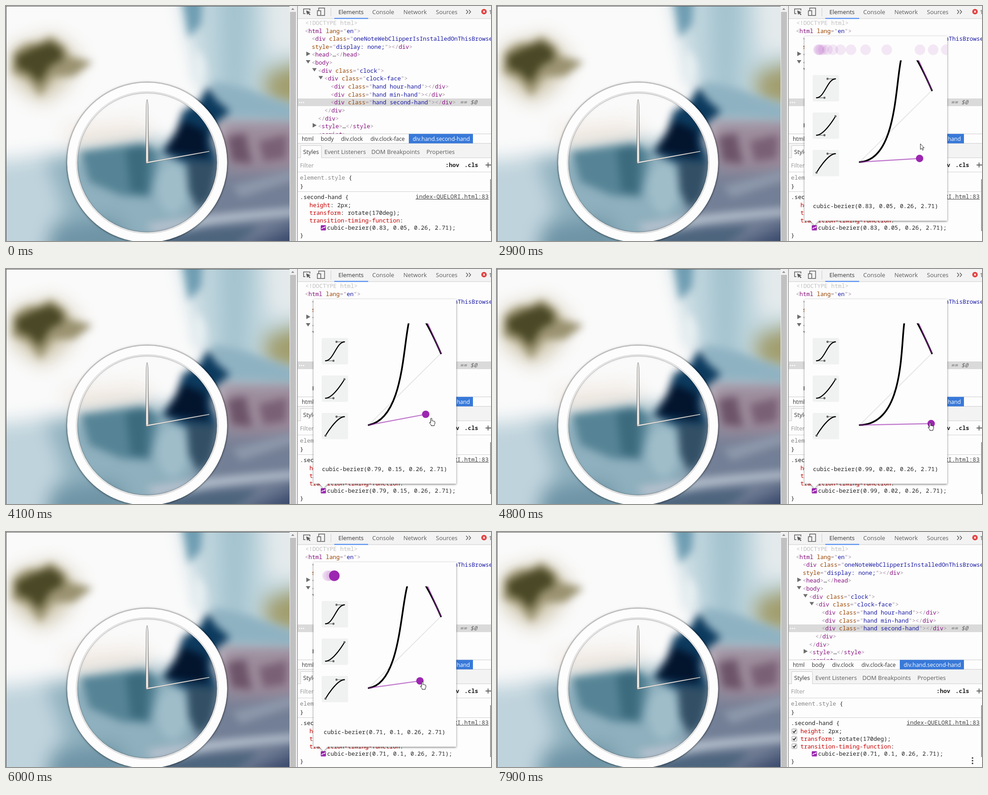
An HTML page for the animation above (8 s loop, 1074 px wide and 521 px high).

```html
<!DOCTYPE html>
<html lang="en">
<head>
<meta charset="utf-8">
<title>Easing editor</title>
<style>
html, body { margin: 0; width: 100%; height: 100%; overflow: hidden; background: #fff; }
svg { display: block; width: 1074px; height: 521px; }
text { white-space: pre; fill: #222; }
.mono { font-family: "Noto Sans Mono", "DejaVu Sans Mono", monospace; font-size: 12.83px; }
.ui { font-family: "Open Sans", "Noto Sans", sans-serif; font-size: 13px; fill: #5a5a5a; }
.crumb { font-size: 12.3px; fill: #333; }
.punct { fill: #a894a6; } .tag { fill: #881280; } .attr { fill: #994500; } .val { fill: #1a1aa6; }
.prop { fill: #c80000; } .dim { fill: #888; }
</style>
</head>
<body>
<svg viewBox="0 0 1074 521" xmlns="http://www.w3.org/2000/svg">
  <defs>
    <filter id="soft" filterUnits="userSpaceOnUse" x="-80" y="-80" width="800" height="700" color-interpolation-filters="sRGB"><feGaussianBlur stdDeviation="9"/></filter>
    <filter id="wide" filterUnits="userSpaceOnUse" x="-120" y="-120" width="880" height="780" color-interpolation-filters="sRGB"><feGaussianBlur stdDeviation="20"/></filter>
    <filter id="glow" x="-10%" y="-10%" width="120%" height="125%"><feDropShadow dx="0" dy="1.5" stdDeviation="2" flood-opacity=".5"/></filter>
    <filter id="ringShade" x="-10%" y="-10%" width="120%" height="120%"><feDropShadow dx="0" dy="0" stdDeviation="3" flood-opacity=".35"/></filter>
    <linearGradient id="steel"><stop offset="0" stop-color="#777"/><stop offset=".3" stop-color="#f5f3f0"/><stop offset=".7" stop-color="#e4e1de"/><stop offset="1" stop-color="#666"/></linearGradient>
    <clipPath id="page"><rect width="628" height="521"/></clipPath>
    <clipPath id="tree"><rect x="646" y="28" width="428" height="255"/></clipPath>
    <clipPath id="plot"><rect x="770" y="120.5" width="227" height="300"/></clipPath>
    <clipPath id="card"><rect x="681" y="67" width="316" height="409"/></clipPath>
  </defs>

  <g clip-path="url(#page)">
    <rect width="628" height="521" fill="#fafafa"/>
    <g filter="url(#wide)">
      <path d="M380-60H690V260H470Q410 120 380-60Z" fill="#bfd5dd"/>
      <path d="M470-60H545L530 230 480 220Z" fill="#a3c3cf"/>
      <path d="M570-60H690V100L580 110Z" fill="#e4eaec"/>
      <path d="M572 150L680 120V222L580 215Z" fill="#a19d6c"/>
      <path d="M-80 350Q80 335 160 325L330 300 440 320 690 240V600H-80Z" fill="#8fb0be"/>
      <path d="M-80 340H90L130 450 60 600H-80Z" fill="#bfd3dc"/>
      <path d="M100 490L240 470 330 600H90Z" fill="#6e94a6"/>
      <path d="M120 270L300 255 330 300 160 318Z" fill="#f0e8e0"/>
      <path d="M12 90L110 65 165 115 130 180 80 215 15 170Z" fill="#d0c8b0"/>
      <path d="M470 340H690V600H330L410 500Z" fill="#737f96"/>
      <path d="M455 250L690 245V370H480Z" fill="#9c8b9b"/>
      <path d="M500 550L690 465V600Z" fill="#37476a"/>
    </g>
    <g filter="url(#soft)">
      <path d="M16 105Q40 78 70 82L100 68 130 90 140 112 192 124 150 155 104 156 76 200 50 164 13 148Z" fill="#9a9270"/>
      <path d="M22 112L58 94 98 80 122 94 126 118 98 132 74 172 52 148 26 138Z" fill="#4a4826"/>
      <path d="M388-30H436L432 40 405 70Z" fill="#6f9db2"/>
      <path d="M420 95Q455 125 432 168L408 160Z" fill="#e6eef1"/>
      <path d="M455 165L540 185 640 222V252L480 245Z" fill="#8fb2c2"/>
      <path d="M448 178L468 210 496 234 462 264 455 300 470 350 440 380 400 350 345 325 376 278 392 232 425 215Z" fill="#0c3a5e"/>
      <path d="M392 255L440 275 446 335 352 324Z" fill="#03142d"/>
      <path d="M400 340L470 345 455 425 425 450 405 410Z" fill="#324f65"/>
      <path d="M490 290L530 282 545 350 500 345Z" fill="#6d5469"/>
      <path d="M560 300L622 285 620 338 570 345Z" fill="#7a6075"/>
      <path d="M165 324L300 305 340 325 318 425 255 420 185 390Z" fill="#568496"/>
      <path d="M265 318L316 308 312 415 276 412Z" fill="#3c6b7e"/>
      <ellipse cx="368" cy="405" rx="32" ry="55" fill="#9fbdc9"/>
      <path d="M500 400L640 362V384L520 425Z" fill="#8d98ab"/>
      <path d="M310 484Q430 462 640 448V464Q440 480 330 506Z" fill="#b5c0cd"/>
      <path d="M330 515Q430 488 560 488L500 540H320Z" fill="#4e657e"/>
    </g>
    <g fill="none" transform="translate(312.6 347)">
      <circle r="178.3" stroke="#000" stroke-opacity=".15" stroke-width="3"/>
      <circle r="167" stroke="#fdfdfd" stroke-width="20" filter="url(#ringShade)"/>
      <circle r="156" stroke="#efefef" stroke-width="2.6"/>
      <circle r="157.2" stroke="#bbb" stroke-width=".7"/>
      <circle r="154.3" stroke="#555" stroke-opacity=".5" stroke-width=".8"/>
    </g>
    <path d="M309.3 348.5L310.3 222Q311 210 312.5 207Q314 210 314.8 222L316 348.5Z" fill="url(#steel)" stroke="#555" stroke-width=".6"/>
    <path d="M310.5 346L450 321.4 450.3 323 311 348.8Z" fill="#f2efec" stroke="#555" stroke-width=".4"/>
    <path d="M0 .5H628M.5 0V521" stroke="#555"/>
  </g>

  <rect x="628" width="17" height="521" fill="#f1f1f1"/>
  <rect x="629" y="13" width="13" height="508" fill="#c1c1c1"/>
  <path d="M631.5 8.5L635 4.5 638.5 8.5Z" fill="#888"/>

  <rect x="645" width="429" height="521" fill="#fdfdfd"/>
  <rect x="646" width="428" height="28" fill="#f3f3f3"/>
  <path d="M646 28H1074" stroke="#ccc"/>
  <path d="M727 27.5H802" stroke="#4285f4" stroke-width="2"/>
  <path d="M719.5 4V23" stroke="#ccc"/>
  <g fill="none" stroke="#5a5a5a" stroke-width="1.5">
    <path d="M663 17H659V6.5H673V10"/>
    <path d="M665 10L674 14 670.5 15 674 19 672.5 20 669 16.5 667 19Z" fill="#5a5a5a" stroke-width=".5"/>
    <path d="M692.5 10V4.5H705.5V21H698M689.5 10.5H697V21H689.5Z"/>
    <path d="M1019 8.5L1023 13 1019 17.5M1025 8.5L1029 13 1025 17.5"/>
  </g>
  <circle cx="1058.5" cy="12.5" r="6" fill="#e03a3a"/>
  <path d="M1056.3 10.3L1060.7 14.7M1060.7 10.3L1056.3 14.7" stroke="#fff" stroke-width="1.4"/>

  <g id="dom" clip-path="url(#tree)"><rect x="646" y="205" width="428" height="17" fill="#dadada"/></g>
  <g fill="#fff"><circle cx="650" cy="214" r="1.4"/><circle cx="654.5" cy="214" r="1.4"/><circle cx="659" cy="214" r="1.4"/></g>

  <path d="M646 283.5H1074M646 304.5H1074" stroke="#ccc"/>
  <rect x="892" y="283.5" width="142" height="21" fill="#3879d9"/>
  <rect x="646" y="305" width="428" height="32" fill="#f3f3f3"/>
  <path d="M646 336.5H1074M646 368H1074M646 411.5H1074" stroke="#d0d0d0"/>
  <path d="M652.5 337V309.5H698.5V337" fill="#fdfdfd" stroke="#ccc"/>
  <path d="M1062 352.5H1074M1067.5 347V358" stroke="#5a5a5a" stroke-width="1.8"/>
  <g id="labels"></g>
  <path d="M907 428.5H1069" stroke="#444"/>
  <rect x="697" y="486" width="11.5" height="11.5" rx="1.5" fill="#9c27b0"/>
  <path d="M699 494.5Q700 491.5 703 491.5T707 488.8" fill="none" stroke="#fff" stroke-width="1.7"/>
  <text id="cssValue" class="mono" x="711" y="496"></text>
  <rect x="1072" y="384" width="2" height="115" fill="#9a9a9a"/>
  <g id="checks"></g>
  <g id="dots" fill="#333"><circle cx="1053" cy="501" r="1.7"/><circle cx="1053" cy="507" r="1.7"/><circle cx="1053" cy="513" r="1.7"/></g>
  <path d="M645.5 0V521" stroke="#777"/>

  <g id="popup">
    <path d="M683 67H995Q997 67 997 69V474Q997 476 995 476H712L703 485.5 694 476H683Q681 476 681 474V69Q681 67 683 67Z" fill="#fdfdfd" filter="url(#glow)"/>
    <g clip-path="url(#card)" fill="#9c27b0"><g id="trail"></g><circle id="ball" cy="97" r="11.7"/></g>
    <g id="presets"></g>
    <g clip-path="url(#plot)" fill="none">
      <path d="M803 346L963 187" stroke="#e8e8e8" stroke-width="2.3"/>
      <path id="curve" stroke="#000" stroke-width="3.7" stroke-linecap="round"/>
      <path id="levers" stroke="#9c27b0" stroke-opacity=".6" stroke-width="2.4"/>
    </g>
    <circle id="knob" r="8.2" fill="#9c27b0"/>
    <text id="popupValue" class="mono" x="838.3" y="448" text-anchor="middle"></text>
  </g>

  <g id="cursor" stroke="#111" fill="#fff" stroke-linejoin="round">
    <path id="arrow" d="M.5.5V13L3.3 10.3 5.2 14.8 7.3 13.9 5.4 9.5H9Z" stroke-width=".9"/>
    <path id="hand" d="M-1.6 1.2Q-1.6-.2-.2-.2T1.2 1.2V6Q2.5 4.8 3.7 6.2 5 5.4 6 6.8 7.6 6.3 7.8 8V12L6.3 14.5V16.5H-.5V14.8L-4 10.5Q-4.8 8.8-3.2 8.6L-1.6 10Z" stroke-width="1"/>
  </g>
</svg>
<script>
const $ = id => document.getElementById(id);
const add = (id, html) => $(id).insertAdjacentHTML('beforeend', html);
const show = (id, on) => $(id).setAttribute('display', on ? 'inline' : 'none');
const set = (id, attrs) => { for (const k in attrs) $(id).setAttribute(k, attrs[k]); };
const span = (cls, s) => `<tspan class="${cls}">${s.replace(/</g, '&lt;')}</tspan>`;

const LOOP = 8000, STEP = 100;
const START = [803, 346], SIZE = [160, 159], P2 = [0.26, 2.71];
const OPEN = 1800, CLOSE = 7200, GRAB = 3600, RELEASE = 5800;
const PREVIEW = 1600, TRAVEL = 254.3, BALL_X = 711.7;

// time, x, y of the draggable control point
const KNOB = [[3600, .83, .05], [4100, .79, .15], [4300, .81, .16], [4500, .87, .12], [4800, .99, .02],
  [5000, .99, .04], [5300, .78, .11], [5400, .74, .1], [5500, .71, .1]];
// time, x, y of the pointer
const POINTER = [[200, 868, 508], [600, 867, 502], [900, 715, 485], [1000, 708, 488], [1100, 701, 491.5],
  [1800, 701, 491.5], [2600, 925, 300], [2900, 937, 305], [3400, 937, 340], [3600, 937, 339],
  [4100, 942, 331], [4500, 948, 328], [4800, 959, 341.5], [5000, 960, 342], [5300, 935, 335],
  [5500, 922, 332], [6000, 922, 332.5], [6600, 1016, 391], [6700, 1016, 397], [6800, 1016, 403],
  [7400, 1016, 403], [7800, 1030, 490]];
const POINTER_ON = [[200, 300], [600, 700], [900, 7900]];
const HOVER = [[200, 1900], [7500, 8000]];

const within = (ranges, t) => ranges.some(([a, b]) => t >= a && t < b);

function track(keys, t) {
  const i = keys.findIndex(k => k[0] > t);
  if (i === 0) return keys[0].slice(1);
  if (i < 0) return keys[keys.length - 1].slice(1);
  const [a, b] = [keys[i - 1], keys[i]], f = (t - a[0]) / (b[0] - a[0]);
  return [1, 2].map(n => a[n] + (b[n] - a[n]) * f);
}

const cubic = (a, b, s) => 3 * (1 - s) ** 2 * s * a + 3 * (1 - s) * s * s * b + s ** 3;

function ease(p1, x) {
  let lo = 0, hi = 1;
  for (let i = 0; i < 30; i++) {
    const mid = (lo + hi) / 2;
    if (cubic(p1[0], P2[0], mid) < x) lo = mid; else hi = mid;
  }
  return cubic(p1[1], P2[1], lo);
}

const toPlot = ([x, y]) => [START[0] + SIZE[0] * x, START[1] - SIZE[1] * y];

function highlight(source) {
  const token = /(<\/?)(\w+)|([\w-]+)(=")([^"]*)(")|(>)|\s+|[^<>\s]/g;
  return source.replace(token, (m, open, name, attr, eq, val, quote, close) =>
    open ? span('punct', open) + span('tag', name)
      : attr ? span('attr', attr) + span('punct', eq) + span('val', val) + span('punct', quote)
      : close ? span('punct', close) : m);
}

const label = (x, y, html, cls = 'mono', extra = '') =>
  add('labels', `<text x="${x}" y="${y}" class="${cls}" ${extra}>${html}</text>`);

function buildTree() {
  const rows = [
    [662, '<html lang="en">'],
    [677, '<div class="oneNoteWebClipperIsInstalledOnThisBrowser"'],
    [677, 'style="display: none;"></div>'],
    [677, '<head>…</head>', 'right'],
    [677, '<body>', 'down'],
    [691, '<div class="clock">', 'down'],
    [705, '<div class="clock-face">', 'down'],
    [719, '<div class="hand hour-hand"></div>'],
    [719, '<div class="hand min-hand"></div>'],
    [719, '<div class="hand second-hand"></div>'],
    [705, '</div>'],
    [691, '</div>'],
    [691, '<style>…</style>', 'right'],
    [691, '<script>']
  ];
  add('dom', '<text class="mono" x="663" y="41.8" style="fill:#c0c0c0">&lt;!DOCTYPE html&gt;</text>');
  rows.forEach(([x, source, arrow], i) => {
    const y = 55 + i * 17.63;
    add('dom', `<text class="mono" x="${x}" y="${y + 4.6}">${highlight(source)}</text>`);
    if (arrow) add('dom', `<path transform="translate(${x - 8} ${y - 2})" fill="#6e6e6e" d="${
      arrow === 'down' ? 'M-5-3.5H5L0 4Z' : 'M-4-5L5 0-4 5Z'}"/>`);
  });
  add('dom', '<text class="mono" x="1005" y="218" font-style="italic" style="fill:#666">== $0</text>');
}

function buildPanels() {
  [[736, 'Elements', '#333'], [811, 'Console'], [880, 'Network'], [952, 'Sources'], [1069, '1']]
    .forEach(([x, s, fill]) => label(x, 17.6, s, 'ui', fill ? `style="fill:${fill}"` : ''));
  [[655, 'html'], [697, 'body'], [742, 'div.clock'], [807, 'div.clock-face']]
    .forEach(([x, s]) => label(x, 298.5, s, 'ui crumb'));
  label(900.5, 298.5, 'div.hand.second-hand', 'ui crumb', 'style="fill:#fff"');
  [[658, 'Styles'], [705, 'Event Listeners'], [809, 'DOM Breakpoints'], [931, 'Properties']]
    .forEach(([x, s]) => label(x, 328, s, 'ui', s === 'Styles' ? 'style="fill:#333"' : ''));
  label(651, 357.5, 'Filter', 'ui', 'style="fill:#999"');
  label(973, 357, ':hov', 'mono', 'font-weight="600"');
  label(1015, 357, '.cls', 'mono', 'font-weight="600"');
  label(651, 384.5, span('dim', 'element.style') + ' {');
  label(651, 403.5, '}');
  label(651, 427.5, '.second-hand {');
  label(907, 427, 'index-QUELORI.html:83', 'mono', 'style="fill:#444"');
  label(672, 446, span('prop', 'height') + ': 2px;');
  label(672, 462.5, span('prop', 'transform') + ': rotate(170deg);');
  label(672, 479.5, span('prop', 'transition-timing-function') + ':');
  label(651, 513, '}');
  [442, 458.5, 475].forEach(y => add('checks',
    `<g fill="none"><rect x="653" y="${y - 5.5}" width="11" height="11" rx="1.5" fill="#f4f4f4" stroke="#999"/>
     <path d="M655.3 ${y}L657.8 ${y + 2.7} 662 ${y - 3.3}" stroke="#333" stroke-width="2"/></g>`));
}

function buildPresets() {
  [[.42, 0, .58, 1], [.42, 0, 1, 1], [0, 0, .58, 1]].forEach(([a, b, c, d], i) => {
    const top = 153 + i * 83, at = (x, y) => `${707.5 + 42 * x} ${top + 50.5 - 42 * y}`;
    const dot = (x, y) => `<circle cx="${707.5 + 42 * x}" cy="${top + 50.5 - 42 * y}" r="2.4" fill="#666"/>`;
    add('presets', `<rect x="699" y="${top}" width="58.5" height="58.5" rx="3" fill="#f0f2f1"/>
      <path d="M${at(0, 0)}L${at(a, b)}M${at(1, 1)}L${at(c, d)}" stroke="#777" stroke-width="1.3"/>
      <path d="M${at(0, 0)}C${at(a, b)} ${at(c, d)} ${at(1, 1)}" fill="none" stroke="#000" stroke-width="2.3" stroke-linecap="round"/>
      ${dot(a, b)}${dot(c, d)}`);
  });
}

function drawPreview(t, p1) {
  const active = t < GRAB || t >= RELEASE;
  show('trail', active);
  const elapsed = t - (t < GRAB ? OPEN : RELEASE);
  const progress = Math.min(Math.max(elapsed / (PREVIEW * .9), 0), 1);
  const pos = ease(p1, progress);
  const reached = progress < .56 ? pos : Infinity;
  show('ball', active && elapsed < PREVIEW);
  set('ball', { cx: BALL_X + TRAVEL * pos, opacity: Math.min(1, (PREVIEW - elapsed) / (PREVIEW * .1)) });
  [...$('trail').children].forEach((dot, i) => {
    const x = ease(p1, i / 20);
    dot.setAttribute('cx', BALL_X + TRAVEL * x);
    dot.setAttribute('opacity', x <= reached ? .1 : 0);
  });
}

function draw(t) {
  const p1 = track(KNOB, t);
  const [kx, ky] = toPlot(p1), c2 = toPlot(P2), end = toPlot([1, 1]);
  const value = `cubic-bezier(${[...p1, ...P2].map(v => +v.toFixed(2)).join(', ')})`;
  $('cssValue').textContent = value + ';';
  $('popupValue').textContent = value;

  show('popup', t >= OPEN && t < CLOSE);
  set('knob', { cx: kx, cy: ky });
  set('levers', { d: `M${START}L${kx} ${ky}M${end}L${c2}` });
  set('curve', { d: `M${START}C${kx} ${ky} ${c2} ${end}` });
  drawPreview(t, p1);

  show('checks', within(HOVER, t));
  show('dots', within(HOVER, t) && (t < OPEN || t >= CLOSE));

  const pointing = t >= 3300 && t < 6100;
  show('cursor', within(POINTER_ON, t));
  show('arrow', !pointing);
  show('hand', pointing);
  set('cursor', { transform: `translate(${track(POINTER, t)})` });
}

buildTree();
buildPanels();
buildPresets();
for (let i = 0; i <= 20; i++) add('trail', '<circle cy="97" r="11.7"/>');

const began = performance.now();
function frame() {
  const t = (performance.now() - began) % LOOP;
  draw(Math.floor(t / STEP) * STEP);
  requestAnimationFrame(frame);
}
frame();
</script>
</body>
</html>
```
